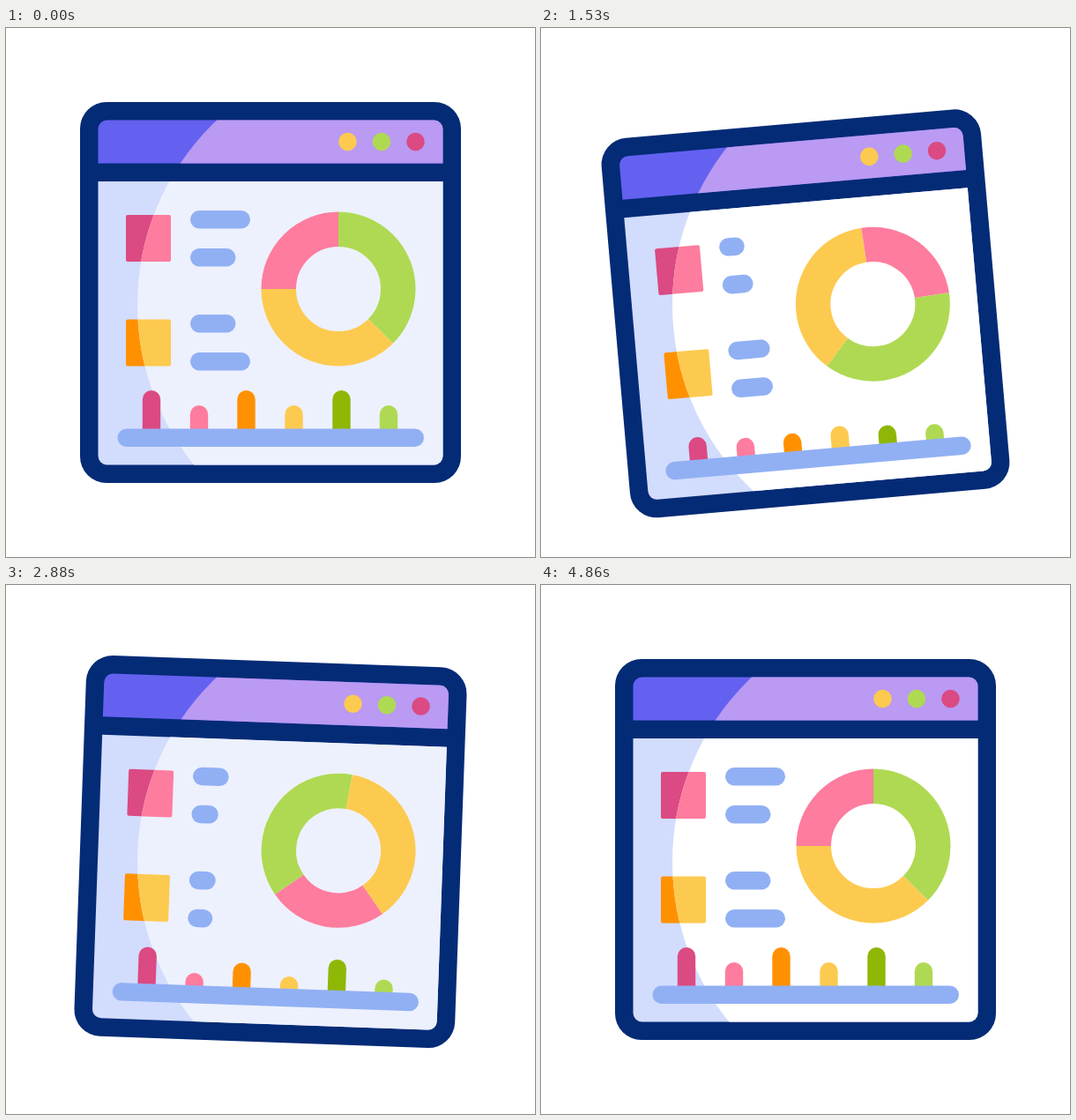
Write an HTML page with a canvas that moves like this. It is 600 px wide and 600 px high and loops after 5.4 s.

```html
<!DOCTYPE html>
<html lang="en">
<head>
<meta charset="utf-8">
<title>Dashboard window</title>
<style>
  html, body { margin: 0; height: 100%; overflow: hidden; background: #fff; }
  canvas { display: block; }
</style>
</head>
<body>
<canvas id="stage" width="600" height="600"></canvas>
<script>
const ctx = document.getElementById('stage').getContext('2d');
const LOOP = 5400, STEP = 30;
const NAVY = '#042b76', BLUE = '#91b0f4';
const ROSE = '#db4a82', PINK = '#fe7c9e', ORANGE = '#ff9100',
      YELLOW = '#fdca50', OLIVE = '#8fb706', GREEN = '#afd952';

// All key times are counted in steps of 30 ms.
const SWAY = { times: [0, 40, 78, 108, 133, 152], values: [0, 36, -24, 17, -12, 0] };
const TILT = { times: [10.5, 50, 87.5, 118, 143, 162], values: [0, -5, 3, -2, 1, 0] };
const SPIN = { times: [0, 160], values: [0, 360] };
const pulse = (...times) => ({ times, values: [0, 1, 0, 1, 0] });
const A = pulse(3, 36, 67, 96, 130);
const B = pulse(0, 28, 60, 96, 130);
const C = pulse(12, 43, 69, 98, 130);
const D = pulse(17, 49, 76, 108, 140);
const E = pulse(15, 49, 88, 108, 138);
const F = pulse(25, 60, 104, 124, 150);

// [x, full height, smallest height, colour, track]
const BARS = [
  [165, 43.5, 22, ROSE, F], [219, 26.5, 14, PINK, A], [272.5, 43.5, 20, ORANGE, D],
  [326.5, 26.5, 14, YELLOW, B], [380.5, 43.5, 20, OLIVE, E], [434, 26.5, 14, GREEN, C]
];
// [y, full width, smallest width, track]
const LINES = [[207, 68, 28, D], [250, 51.5, 30, C], [325, 51.5, 30, B], [368, 68, 28, A]];
// [start angle, end angle, colour]
const SLICES = [[0, 135, GREEN], [135, 270, YELLOW], [270, 360, PINK]];

const rad = deg => deg * Math.PI / 180;

function sample({ times, values }, n) {
  if (n <= times[0]) return values[0];
  const i = times.findIndex(time => n < time);
  if (i < 0) return values[values.length - 1];
  const u = (n - times[i - 1]) / (times[i] - times[i - 1]);
  return values[i - 1] + (values[i] - values[i - 1]) * u * u * (3 - 2 * u);
}

function box(x, y, w, h, radius, color) {
  ctx.fillStyle = color;
  ctx.beginPath();
  ctx.roundRect(x, y, w, h, radius);
  ctx.fill();
}

function panels(header, body, topSquare, lowSquare) {
  box(104.5, 104.5, 391, 49, [10, 10, 0, 0], header);
  box(104.5, 174, 391, 321.5, [0, 0, 10, 10], body);
  box(136, 212, 51, 53, 2, topSquare);
  box(136, 330.5, 51, 53, 2, lowSquare);
}

function donut(angle) {
  ctx.lineWidth = 39.5;
  for (const [from, to, color] of SLICES) {
    ctx.strokeStyle = color;
    ctx.beginPath();
    ctx.arc(377, 296, 67.75, rad(from + angle - 90), rad(to + angle - 90));
    ctx.stroke();
  }
}

function draw(n) {
  const place = () => {
    ctx.translate(300, 300 + sample(SWAY, n));
    ctx.rotate(rad(sample(TILT, n)));
    ctx.translate(-300, -300);
  };
  const paper = n >= 134 || (n >= 46 && n < 57) ? '#ffffff' : '#edf1fd';

  ctx.clearRect(0, 0, 600, 600);
  ctx.save();
  place();
  box(84, 84, 432, 432, 30, NAVY);
  panels('#6461f1', '#d2dcfd', ROSE, ORANGE);
  ctx.restore();

  // The highlight circle stays still while the window moves under it.
  ctx.save();
  ctx.beginPath();
  ctx.arc(438, 314, 289, 0, 2 * Math.PI);
  ctx.clip();
  place();
  panels('#ba9af2', paper, PINK, YELLOW);
  ctx.restore();

  ctx.save();
  place();
  [YELLOW, GREEN, ROSE].forEach((color, i) =>
    box(377.2 + 38.5 * i, 118.7, 20.6, 20.6, 10.3, color));
  for (const [y, full, low, track] of LINES)
    box(209, y, full + (low - full) * sample(track, n), 20.5, 10.25, BLUE);
  donut(sample(SPIN, n));
  for (const [x, full, low, color, track] of BARS) {
    const height = full + (low - full) * sample(track, n);
    box(x - 10.2, 454.5 - height, 20.4, height + 5, [10.2, 10.2, 0, 0], color);
  }
  box(126.5, 454.5, 347.5, 20.5, 10.25, BLUE);
  ctx.restore();
}

function tick() {
  draw(Math.floor(performance.now() % LOOP / STEP));
  requestAnimationFrame(tick);
}
tick();
</script>
</body>
</html>
```
